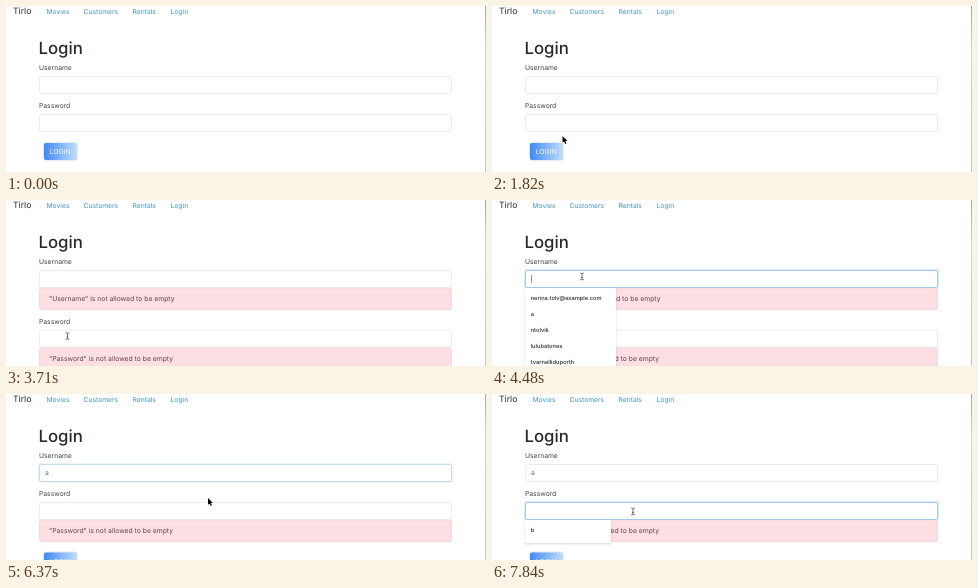
These frames come from a looping animation (480x166 px, 8 s). An HTML page:

```html
<!DOCTYPE html>
<html lang="en">
<head>
<meta charset="utf-8">
<title>Login form</title>
<style>
  html, body { margin: 0; width: 100%; height: 100%; overflow: hidden; background: #fff; }
  #stage { position: relative; width: 480px; height: 166px; overflow: hidden; background: #fff;
    font-family: Inter, "Open Sans", sans-serif; text-rendering: geometricPrecision; }
  #stage div { position: absolute; box-sizing: border-box; }
  .text { white-space: pre; line-height: 20px; }
  .input { left: 33px; width: 413px; height: 18px; border: 1px solid; border-radius: 2px; background: #fff; }
  .alert { left: 33px; width: 413px; height: 21.5px; border: 1px solid #f6d7db; border-radius: 2px; background: #fbdfe3; }
  .caret { width: 1px; height: 8px; background: #8c9196; }
  .menu { left: 33px; background: #fff; box-shadow: 0 0.5px 2px rgba(0,0,0,.16); }
  .button { left: 38px; top: 137px; width: 32.5px; height: 17px; border-radius: 2px;
    background: linear-gradient(to right, #4188f4, #bfdffc, #4188f4) 0 0 / 200% 100%;
    box-shadow: 0 0 1.5px rgba(60,90,130,.6); }
  .edge { left: 479px; top: 0; width: 1px; height: 166px; background: linear-gradient(#8fabb0, #cbd8db 25%, #bccacd); }
  svg { position: absolute; left: 0; top: 0; width: 480px; height: 166px; }
</style>
</head>
<body>
<div id="stage"></div>
<script>
const LOOP = 8000, STEP = 70, ALERT_H = 21.5;
const stage = document.getElementById('stage');

function box(cls, parent = stage) {
  const el = document.createElement('div');
  el.className = cls;
  parent.appendChild(el);
  return el;
}

// y is the middle of the capital letters
function text(str, x, y, size = 6.75, color = '#3c4247', weight = 400, parent = stage) {
  const el = box('text', parent);
  el.textContent = str;
  el.style.cssText = `left:${x}px;top:${y - 10}px;font-size:${size}px;color:${color};font-weight:${weight}`;
  return el;
}

function show(el, visible) { el.style.display = visible ? '' : 'none'; }
function shift(el, y) { el.style.transform = `translateY(${y}px)`; }

function field(label, top) {
  const group = box('');
  group.style.cssText = 'left:0;top:0';
  text(label, 33, top - 8, 6.75, '#3c4247', 400, group);
  const input = box('input', group);
  input.style.top = top + 'px';
  const value = text('', 39, top + 9, 6.75, '#62686e', 400, group);
  const caret = box('caret', group);
  caret.style.top = top + 5 + 'px';
  const alert = box('alert', group);
  alert.style.top = top + 18 + 'px';
  text(`"${label}" is not allowed to be empty`, 9, 9.5, 6.8, '#664249', 400, alert);
  return { group, input, value, caret, alert };
}

function menu(top, width, height, items) {
  const el = box('menu');
  el.style.cssText = `top:${top}px;width:${width}px;height:${height}px`;
  items.forEach((s, i) => text(s, 5.7, 11.3 + i * 16, 5.7, '#2a2a2a', 500, el));
  return el;
}

text('Tirlo', 7, 6.3, 8.7, '#2a2a2a');
[['Movies', 40.5], ['Customers', 77.5], ['Rentals', 126.5], ['Login', 164.5]]
  .forEach(([s, x]) => text(s, x, 6.3, 6.75, '#4493c4'));
text('Login', 32.5, 42.9, 16.8, '#24292e', 500);

const user = field('Username', 70);
const pass = field('Password', 108);
const button = box('button');
text('LOGIN', 5.5, 8.5, 6.9, '#f4f9ff', 400, button);

const menuAll = menu(88, 91, 90, ['nerina.tolv@example.com', 'a', 'ntolvik', 'lulubatones', 'tvarnelliduporth']);
const menuA = menu(88, 85.5, 39, ['a', 'aaa']);
const menuB = menu(126, 85.5, 23, ['b']);
box('edge');

stage.insertAdjacentHTML('beforeend', `<svg><g id="pointer">
  <path id="arrow" d="M0 0V6.8L1.6 5.4 2.7 7.9 3.9 7.4 2.8 5H5Z" fill="#000" stroke="#fff" stroke-width=".7" paint-order="stroke"/>
  <path id="beam" d="M-1.8-3.3Q0-3.3 0-2.5Q0-3.3 1.8-3.3M0-2.6V2.6M-1.8 3.3Q0 3.3 0 2.5Q0 3.3 1.8 3.3M-.8 1H.8" fill="none" stroke="#444" stroke-width=".75"/>
  <path id="hand" transform="translate(-2.8 -.5)" d="M2 1a.8.8 0 0 1 1.6 0V4l3 .7q.9.3.8 1.2L6.8 8.8H3L.4 5.8q0-1.1 1-.7L2 5.6Z" fill="#fff" stroke="#111" stroke-width=".7"/>
</g></svg>`);
const pointer = document.getElementById('pointer');
const shapes = ['arrow', 'beam', 'hand'].map(id => document.getElementById(id));

// pointer path: time, x, y
const PATH = [
  [350, 232, 160], [560, 205, 90], [770, 150, 26], [980, 68, 90], [1120, 81, 115],
  [1260, 147, 19], [1330, 147, 19], [1400, 149, 13], [1610, 110, 60], [1820, 70.5, 130],
  [2170, 64, 136], [2590, 58, 143.5], [3640, 58, 143.5], [4270, 90, 76.5], [5110, 90, 76.5],
  [5530, 120, 76], [5880, 195, 104], [5950, 198, 104], [6020, 198, 104], [6160, 202, 104],
  [6510, 202, 104], [6580, 198, 100], [6790, 143, 128], [6860, 143, 128], [7000, 141, 121],
  [7140, 141, 117.5], [LOOP, 141, 117.5]
];

function pointerAt(t) {
  const i = PATH.findIndex(p => p[0] > t);
  const [t0, x0, y0] = PATH[i - 1], [t1, x1, y1] = PATH[i];
  const k = (t - t0) / (t1 - t0);
  return [x0 + (x1 - x0) * k, y0 + (y1 - y0) * k];
}

const clamp = v => Math.max(0, Math.min(1, v));
const fade = (t, from, to, span = 150) =>
  clamp((t - from + STEP) / span) * (1 - clamp((t - to + STEP) / span));

function setFocus(f, k) {
  const mix = (a, b) => Math.round(a + (b - a) * k);
  f.input.style.borderColor = `rgb(${mix(234, 165)},${mix(236, 203)},${mix(238, 232)})`;
  f.input.style.boxShadow = `0 0 0 1px rgba(90,160,225,${0.22 * k})`;
}

function setCaret(f, t, from, to, x) {
  show(f.caret, t >= from && t < to && (t - from) % 1000 < 500);
  f.caret.style.left = x + 'px';
}

function render(time) {
  const t = Math.floor(time / STEP) * STEP;
  const during = (a, b) => t >= a && t < b;
  const userError = during(3220, 5180), passError = t >= 3220;
  const drop = userError ? ALERT_H : 0;

  show(user.alert, userError);
  show(pass.alert, passError);
  shift(pass.group, drop);
  shift(button, drop + (passError ? ALERT_H : 0));

  user.value.textContent = t >= 5110 ? 'a' : '';
  setFocus(user, fade(t, 4340, 6370));
  setFocus(pass, t < 5000 ? fade(t, 2380, 3220) : fade(t, 7280, 9000));
  setCaret(user, t, t < 5110 ? 4400 : 5110, 6370, t < 5110 ? 39 : 43);
  setCaret(pass, t, t < 5000 ? 2380 : 7300, t < 5000 ? 3220 : LOOP, 39);

  show(menuAll, during(4410, 5110));
  show(menuA, during(5180, 6370));
  show(menuB, t >= 7350);

  // hovering slides the gradient to its mirrored half
  button.style.backgroundPosition = 100 * fade(t, 2240, 3710, 400) + '% 0';

  show(pointer, t >= 350);
  if (t < 350) return;
  const [x, y] = pointerAt(t);
  const inField = top => x > 33 && x < 446 && y > top && y < top + 18;
  const onButton = t < 3710 && x > 38 && x < 70 && y > 137 && y < 154;
  const kind = onButton ? 2 : inField(70) || inField(108 + drop) ? 1 : 0;
  pointer.setAttribute('transform', `translate(${x} ${y})`);
  shapes.forEach((s, i) => show(s, i === kind));
}

const start = performance.now();
function tick() {
  render((performance.now() - start) % LOOP);
  requestAnimationFrame(tick);
}
tick();
</script>
</body>
</html>
```
